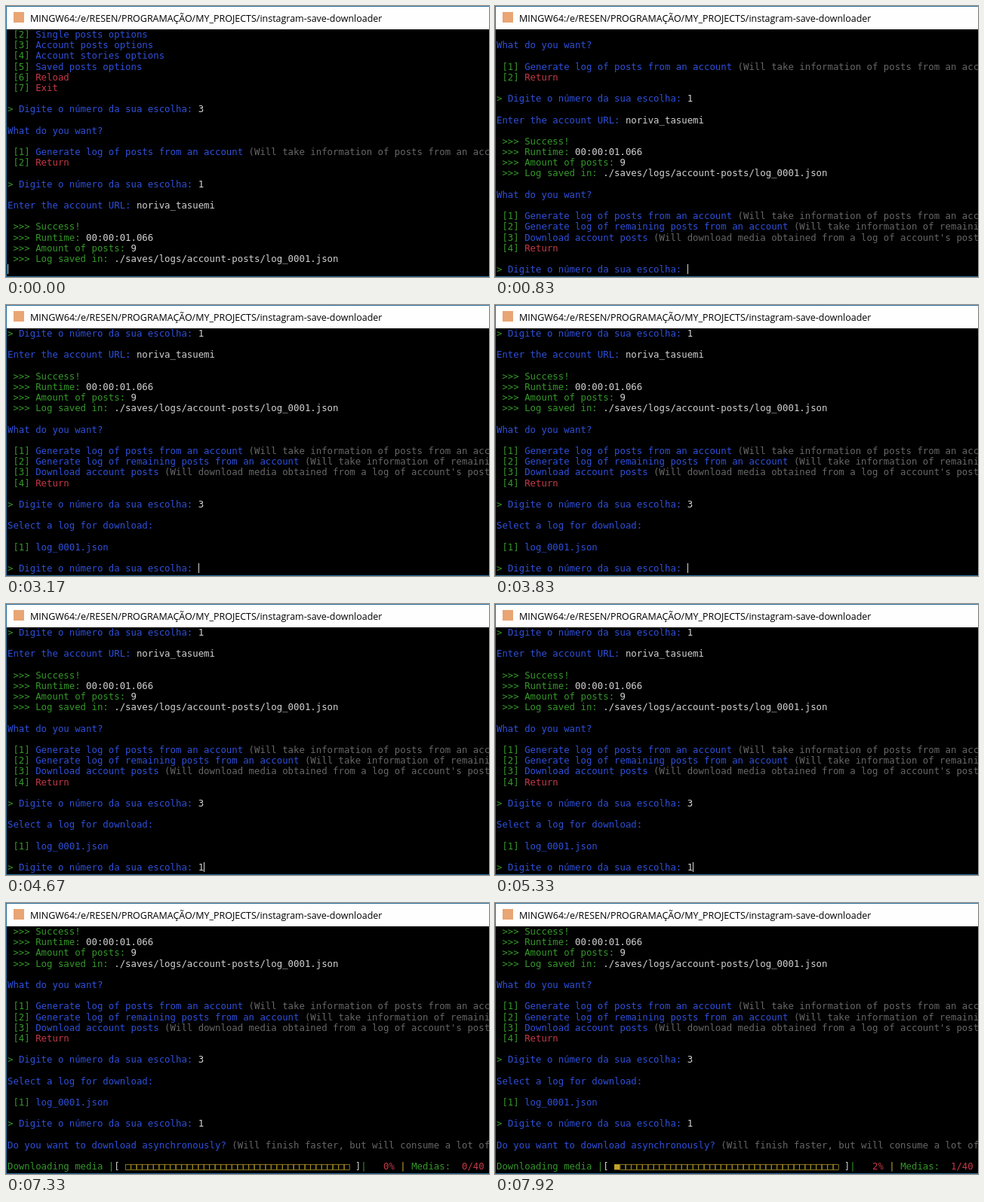
An HTML page for the animation above (8000 ms loop, 640x360 px).

```html
<!DOCTYPE html>
<html lang="en">
<head>
<meta charset="utf-8">
<title>Terminal session</title>
<style>
  html, body { margin: 0; width: 100%; height: 100%; overflow: hidden; background: #000; }
  #window { position: absolute; left: 0; top: 0; width: 640px; height: 360px; overflow: hidden; background: #000; }
  #frame { position: absolute; inset: 0; border: solid #2b6f9c; border-width: 1px 0 1px 1px; }
  #bar { position: absolute; left: 1px; top: 1px; right: 0; height: 30px; background: #fefefe; }
  #icon { position: absolute; left: 10px; top: 8px; width: 14px; height: 14px; background: #e9a574; }
  #title { position: absolute; left: 32px; top: 2px; font: 12.48px/30px "Open Sans", sans-serif; color: #000; white-space: pre; }
  #screen { position: absolute; left: 2px; top: 31px; margin: 0; font: 12.35px/14.2px "DejaVu Sans Mono", monospace; }
  #screen div { height: 14.2px; white-space: pre; }
  .green { color: #35982a; }
  .blue { color: #2f50da; }
  .red { color: #c43a48; }
  .dim { color: #676767; }
  .pale { color: #d2d2d2; }
  .gold { color: #c2a428; }
  .cursor { display: inline-block; width: 1px; height: 13px; vertical-align: -2px; background: #d8d8d8; }
</style>
</head>
<body>
<div id="window">
  <div id="frame"></div>
  <div id="bar"></div>
  <div id="icon"></div>
  <div id="title">MINGW64:/e/RESEN/PROGRAMAÇÃO/MY_PROJECTS/instagram-save-downloader</div>
  <div id="screen"></div>
</div>
<script>
const LOOP = 8000, ROWS = 23;

// A line is a list of [colour class, text] parts.
const cursor = ["cursor", ""];
const blank = [];
const heading = text => [["blue", text]];
const option = (n, text, note = "") =>
  [["green", ` [${n}] `], ["blue", text], ["dim", note && ` (${note})`]];
const action = (n, text) => [["green", ` [${n}] `], ["red", text]];
const prompt = (answer = "", active = false) => [
  ["green", "> "], ["blue", "Digite o número da sua escolha: "],
  ["pale", answer], ...(active ? [cursor] : [])
];
const result = (label, value = "") => [["green", ` >>> ${label} `], ["pale", value]];
const progress = (done, total = 40) => [
  ["green", "Downloading media |"], ["pale", "[ "],
  ["gold", "■".repeat(done) + "□".repeat(total - done)],
  ["pale", " ]"], ["green", "|"],
  ["red", `${Math.floor(done / total * 100)}%`.padStart(5)],
  ["gold", " | "], ["green", "Medias: "],
  ["red", `${done}`.padStart(2) + `/${total}`]
];
const generateLog = option(1, "Generate log of posts from an account",
  "Will take information of posts from an account");

// Each step rewrites the current line and continues below it.
const steps = [
  { at: 0, lines: [
    option(2, "Single posts options"),
    option(3, "Account posts options"),
    option(4, "Account stories options"),
    option(5, "Saved posts options"),
    action(6, "Reload"),
    action(7, "Exit"),
    blank, prompt("3"), blank,
    heading("What do you want?"), blank,
    generateLog, action(2, "Return"),
    blank, prompt("1"), blank,
    [["blue", "Enter the account URL: "], ["pale", "noriva_tasuemi"]], blank,
    result("Success!"),
    result("Runtime:", "00:00:01.066"),
    result("Amount of posts:", "9"),
    result("Log saved in:", "./saves/logs/account-posts/log_0001.json"),
    [cursor]
  ] },
  { at: 330, lines: [
    blank, heading("What do you want?"), blank,
    generateLog,
    option(2, "Generate log of remaining posts from an account",
      "Will take information of remaining posts"),
    option(3, "Download account posts",
      "Will download media obtained from a log of account's posts"),
    action(4, "Return"),
    blank, prompt("", true)
  ] },
  { at: 1500, lines: [prompt("3", true)] },
  { at: 2500, lines: [
    prompt("3"), blank,
    heading("Select a log for download:"), blank,
    option(1, "log_0001.json"),
    blank, prompt("", true)
  ] },
  { at: 3920, lines: [prompt("1", true)] },
  { at: 5580, lines: [
    prompt("1"), blank,
    [["blue", "Do you want to download asynchronously? "],
     ["dim", "(Will finish faster, but will consume a lot of resources)"]]
  ] },
  { at: 7170, lines: [null, blank, progress(0)] },
  { at: 7670, lines: [progress(1)] }
];

let transcript = [];
for (const step of steps) {
  const current = transcript.at(-1);
  transcript = [...transcript.slice(0, -1), ...step.lines.map(line => line || current)];
  step.view = transcript.slice(-ROWS);
}

const screen = document.getElementById("screen");
let shown;

function span([colour, text]) {
  const part = document.createElement("span");
  part.className = colour;
  part.textContent = text;
  return part;
}

function row(line) {
  const element = document.createElement("div");
  element.append(...line.map(span));
  return element;
}

function draw() {
  const time = performance.now() % LOOP;
  const step = steps.findLast(s => s.at <= time);
  if (step !== shown) {
    screen.replaceChildren(...step.view.map(row));
    shown = step;
  }
  requestAnimationFrame(draw);
}
draw();
</script>
</body>
</html>
```
